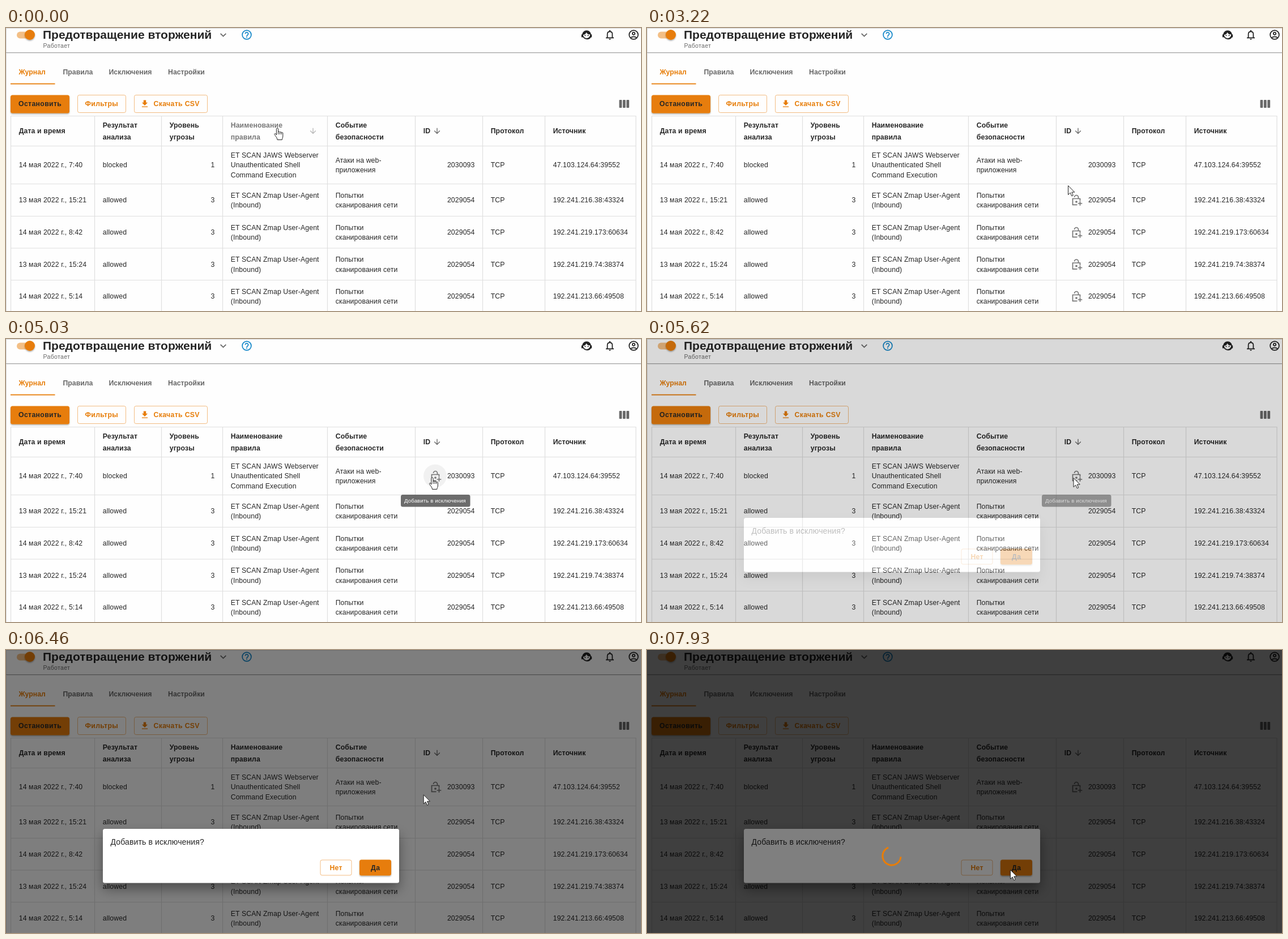
Write an HTML page that moves like this. It is 1121 px wide and 500 px high and loops after 8000 ms.

```html
<!DOCTYPE html>
<html lang="ru">
<head>
<meta charset="utf-8">
<style>
  html, body { margin: 0; width: 100%; height: 100%; overflow: hidden; background: #fefefe; }
  svg { display: block; width: 1121px; height: 500px; }
  text { font: 12.25px "Liberation Sans", Arial, sans-serif; letter-spacing: .13px; fill: #262626; }
  .bold { font-weight: bold; }
  .button { font-weight: bold; letter-spacing: .35px; }
  .tab { font-weight: bold; letter-spacing: .03px; }
  .title { font-size: 21px; font-weight: bold; letter-spacing: 0; }
  .caption { font-size: 10.5px; letter-spacing: .35px; }
  .tip { font-size: 9.625px; }
  .question { font-size: 14px; }
  .line { fill: none; stroke: currentColor; stroke-width: 2; }
</style>
</head>
<body>
<svg id="stage" viewBox="0 0 1121 500" xmlns="http://www.w3.org/2000/svg"></svg>
<script>
const ORANGE = '#e77d08', GRAY = '#686868', INK = '#222';
const LOOP = 8000;
const columns = [8.5, 156.5, 274.5, 382.5, 567.5, 722.5, 841.5, 951.5, 1112];
const rowLines = [155.5, 208.5, 275.5, 332.5, 389, 445.5];
const rowCenters = [242, 304, 361, 417.5, 474];
const ICON_X = 758;

// Text is placed by the vertical centre of its line.
const text = (x, y, str, cls = '', fill = '', anchor = 'start') =>
  `<text x="${x}" y="${y + 4.3}" class="${cls}" text-anchor="${anchor}"${fill && ` style="fill:${fill}"`}>${str}</text>`;
const lines = (x, center, step, list, cls, fill) =>
  list.map((s, i) => text(x, center + (i - (list.length - 1) / 2) * step, s, cls, fill)).join('');
const rect = (x, y, w, h, fill, r = 0, extra = '') =>
  `<rect x="${x}" y="${y}" width="${w}" height="${h}" rx="${r}" fill="${fill}" ${extra}/>`;
// Icons are drawn on a 24-unit grid around their centre.
const icon = (x, y, color, body, scale = .875) =>
  `<g transform="translate(${x} ${y}) scale(${scale}) translate(-12 -12)" style="color:${color}" fill="${color}">${body}</g>`;
const stroke = d => `<path class="line" d="${d}"/>`;
const outlined = (x, y, w, h) =>
  rect(x + .5, y + .5, w - 1, h - 1, 'none', 3, `stroke="${ORANGE}" stroke-opacity=".5"`);
const filled = (x, y, w, h, id = '') =>
  rect(x, y, w, h, ORANGE, 3.5, `filter="url(#lift)" ${id}`);

const sortArrow = (x, color) => icon(x, 182, color,
  '<path d="M20 12l-1.4-1.4L13 16.2V4h-2v12.2l-5.6-5.6L4 12l8 8z"/>', .656);

function topBar() {
  return rect(0, 0, 1121, 1, '#d4d4d4') + rect(0, 0, 1, 500, '#d9d9d9') +
    rect(0, 43, 1121, 1, '#a2a2a2') + rect(0, 44, 1121, 1, '#e6e6e6') +
    rect(19, 6.5, 31, 12, '#f3bf86', 6) +
    `<circle cx="42" cy="12" r="9" fill="${ORANGE}" filter="url(#lift)"/>` +
    text(65, 14.7, 'Предотвращение вторжений', 'title') +
    text(65.5, 30.8, 'Работает', 'caption', GRAY) +
    icon(383.5, 12, '#666', stroke('M6.5 9.5l5.5 5.5 5.5-5.5')) +
    icon(425, 12, '#1588c9', '<circle class="line" cx="12" cy="12" r="9"/>' +
      stroke('M9 10a3 3 0 1 1 4.6 2.5c-1 .7-1.6 1.2-1.6 2.5M12 16v2')) +
    icon(1025, 12, INK, '<circle class="line" cx="12" cy="12" r="8"/>' +
      '<path d="M4 12C4 2 20 2 20 11c-4 1-7-1-8.500-4C10.500 10 8 12 4 12z"/>' +
      '<circle cx="9" cy="13.500" r="1.200"/><circle cx="15" cy="13.500" r="1.200"/>' +
      rect(1.5, 11, 3, 6, 'currentColor', 1) + rect(19.5, 11, 3, 6, 'currentColor', 1) +
      stroke('M20 16c-1 3-4 4.500-8 4.500')) +
    icon(1066, 12, INK, stroke('M7 18v-7.500c0-3 2-5 5-5s5 2 5 5V18M4 18h16') +
      '<circle cx="12" cy="4" r="1.500"/><path d="M10 20h4a2 2 0 0 1-4 0z"/>') +
    icon(1108, 12, INK, '<circle class="line" cx="12" cy="12" r="9"/>' +
      '<circle class="line" cx="12" cy="9.500" r="2.500"/>' + stroke('M6 18c3-3 9-3 12 0'));
}

function controls() {
  const tabs = [[100.5, 'Правила'], [181.5, 'Исключения'], [286, 'Настройки']];
  return text(22.5, 78, 'Журнал', 'tab', ORANGE) +
    tabs.map(([x, s]) => text(x, 78, s, 'tab', GRAY)).join('') +
    rect(8, 97.7, 78.5, 1.8, ORANGE) +
    filled(8, 118.5, 104, 32) + text(22, 134, 'Остановить', 'button') +
    outlined(126, 118, 86, 32) + text(139.5, 134, 'Фильтры', 'button', ORANGE) +
    outlined(226, 118, 130, 32) + text(260.5, 134, 'Скачать CSV', 'button', ORANGE) +
    icon(245, 134, ORANGE, '<path d="M19 9h-4V3H9v6H5l7 7zM5 18v2h14v-2z"/>', .73) +
    [0, 6.4, 12.8].map(dx => rect(1082.5 + dx, 127, 4.8, 14, GRAY, 1)).join('');
}

function table() {
  const scan = ['ET SCAN Zmap User-Agent', '(Inbound)'];
  const attempts = ['Попытки', 'сканирования сети'];
  const rows = [
    ['14 мая 2022 г., 7:40', 'blocked', 1,
      ['ET SCAN JAWS Webserver', 'Unauthenticated Shell', 'Command Execution'],
      ['Атаки на web-', 'приложения'], '2030093', '47.103.124.64:39552'],
    ...[['13 мая 2022 г., 15:21', '192.241.216.38:43324'],
      ['14 мая 2022 г., 8:42', '192.241.219.173:60634'],
      ['13 мая 2022 г., 15:24', '192.241.219.74:38374'],
      ['14 мая 2022 г., 5:14', '192.241.213.66:49508']]
      .map(([date, source]) => [date, 'allowed', 3, scan, attempts, '2029054', source])
  ];
  const heads = [['Дата и время'], ['Результат', 'анализа'], ['Уровень', 'угрозы'], null,
    ['Событие', 'безопасности'], ['ID'], ['Протокол'], ['Источник']];
  const left = i => columns[i] + 14.2;
  const grid = rowLines.map(y => `M8 ${y}H1112.500`).join('') +
    columns.map(x => `M${x} 155V500`).join('');
  return `<path d="${grid}" stroke="#dfdfdf" stroke-width="1.2" fill="none"/>` +
    heads.map((h, i) => h ? lines(left(i), 181.7, 21, h, 'bold') : '').join('') +
    sortArrow(761, '#666') +
    rows.map(([date, result, level, rule, event, id, source], i) => {
      const y = rowCenters[i];
      return text(left(0), y, date) + text(left(1), y, result) +
        text(368.5, y, level, '', '', 'end') +
        lines(left(3), y, 17.5, rule) + lines(left(4), y, 17.5, event) +
        text(827.5, y, id, '', '', 'end') + text(left(6), y, 'TCP') + text(left(7), y, source);
    }).join('');
}

const ruleHead = (id, fill, extra = '') =>
  `<g id="${id}">${lines(396.7, 181.7, 21, ['Наименование', 'правила'], 'bold', fill)}${extra}</g>`;

const lock = y => `<g transform="translate(${ICON_X} ${y})" fill="none" stroke="#757575" stroke-width="1.7">
  <path d="M1.500 8.300H-6.500V-2.500H6.500V1.500M3.500-2.500V-5a3.500 3.500 0 0 0-7 0M6.500 2.200v7.600M2.700 6h7.600"/>
  <circle cy="3" r="1" /></g>`;

const tooltip = (id, y) => `<g id="${id}">${rect(697, y + 33, 122.5, 21.5, '#616161', 3.5, 'opacity=".93"')}` +
  text(703, y + 43, 'Добавить в исключения', 'tip', '#fff') + '</g>';

const dialog = rect(171, 316, 523, 95.5, '#fff', 3.5, 'filter="url(#deep)"') +
  text(184.5, 339.5, 'Добавить в исключения?', 'question') +
  outlined(554.5, 370.5, 56, 28) + text(582.7, 384.5, 'Нет', 'button', ORANGE, 'middle') +
  filled(624, 370.5, 56, 28, 'id="yes"') + text(652.2, 384.5, 'Да', 'button', '', 'middle');

const stage = document.getElementById('stage');
stage.innerHTML = `<defs>
  <filter id="lift" x="-20%" y="-30%" width="140%" height="180%">
    <feDropShadow dx="0" dy="1.500" stdDeviation="1.200" flood-opacity=".35"/></filter>
  <filter id="deep" x="-10%" y="-40%" width="120%" height="220%">
    <feDropShadow dx="0" dy="11" stdDeviation="11" flood-opacity=".38"/></filter></defs>` +
  rect(0, 0, 1121, 500, '#fefefe') + topBar() + controls() + table() +
  ruleHead('headIdle', '') + ruleHead('headHover', '#777', sortArrow(542, '#b5b5b5')) +
  `<circle id="halo" cx="757.500" r="20.500" opacity=".05"/>` +
  `<g id="firstLock">${lock(rowCenters[0])}</g>` +
  `<g id="otherLocks">${rowCenters.slice(1).map(lock).join('')}</g>` +
  tooltip('tipFirst', rowCenters[0]) + tooltip('tipSecond', rowCenters[1]) +
  `<g id="modal">${rect(0, 0, 1121, 500, '#000', 0, 'opacity=".5"')}${dialog}</g>
  <g id="loader">${rect(0, 0, 1121, 500, '#000', 0, 'opacity=".5"')}
    <circle id="spinner" cx="432" cy="364" r="16.100" fill="none" stroke="${ORANGE}" stroke-width="3.100"/></g>
  <g id="cursor" fill="#fff" stroke="#222" stroke-width="1" stroke-linejoin="round">
    <path id="arrow" d="M.500.500V16.500L4.200 13 6.800 18.800 9.300 17.700 6.800 12H11.800Z"/>
    <path id="hand" d="M-1.600 12V1.500a1.600 1.600 0 0 1 3.200 0V7a1.500 1.500 0 0 1 2.900.4 1.500 1.500 0 0 1 2.800.6
      1.400 1.400 0 0 1 2.500.8V14c0 3-1.500 4-1.500 6.500H0C0 17-3 14.500-4.800 11.500-5.800 9.800-3.600 8.700-2.600 10z
      M1.600 7v4M4.500 7.400v3.600M7.300 8v3"/></g>`;

const el = {};
stage.querySelectorAll('[id]').forEach(node => el[node.id] = node);

// Pointer path: time, x, y.
const path = [
  [0, 479, 177], [30, 479, 177], [800, 708, 247], [1000, 714, 250], [1210, 729, 253],
  [1630, 744, 244], [1740, 751, 241], [2600, 751, 241], [3080, 746, 274], [3220, 743, 278],
  [3600, 752, 306], [4200, 752, 306], [5030, 752.5, 245], [6390, 752.5, 245], [6460, 737, 255],
  [6870, 617, 377], [6980, 617, 377], [7260, 641, 388], [LOOP, 641, 388]
];
const ramp = (t, from, to) => Math.min(1, Math.max(0, (t - from) / (to - from)));
const smooth = k => k * k * (3 - 2 * k);
const show = (node, on) => node.setAttribute('visibility', on ? 'visible' : 'hidden');
const fade = (node, k) => { node.setAttribute('opacity', k); show(node, k > 0); };

function pointerAt(t) {
  const i = Math.max(1, path.findIndex(p => p[0] >= t));
  const [t0, x0, y0] = path[i - 1], [t1, x1, y1] = path[i];
  const k = ramp(t, t0, t1);
  return [x0 + (x1 - x0) * k, y0 + (y1 - y0) * k];
}

function spin(t) {
  const turn = (t - 7400) / 1400;
  const grow = smooth(ramp(turn, 0, .5));
  const unit = 16.1 / 20.2;
  el.spinner.setAttribute('stroke-dasharray', `${(1 + 99 * grow) * unit} ${200 * unit}`);
  el.spinner.setAttribute('stroke-dashoffset', -15 * grow * unit);
  el.spinner.setAttribute('transform', `rotate(${turn * 360 - 168} 432 364)`);
}

function draw(t) {
  const [x, y] = pointerAt(t);
  const browsing = t < 5400;
  const onHead = browsing && y < rowLines[1];
  const onRuleHead = onHead && x < columns[4];
  const onFirst = !onHead && (!browsing || y < rowLines[2]);
  const lockY = rowCenters[onFirst ? 0 : 1];
  const onLock = !onHead && t < 5550 && Math.hypot(x - ICON_X, y - lockY) < 20;
  const onYes = t > 7020 && t < 7400 && x > 624;

  show(el.headIdle, !onRuleHead);
  show(el.headHover, onRuleHead);
  show(el.firstLock, onFirst);
  show(el.otherLocks, !onHead && !onFirst);
  show(el.halo, onLock);
  el.halo.setAttribute('cy', lockY);

  fade(el.tipFirst, t < 4000
    ? ramp(t, 1680, 1800) * (1 - ramp(t, 2680, 2880))
    : ramp(t, 4920, 5030) * (1 - ramp(t, 5500, 5800)));
  fade(el.tipSecond, ramp(t, 3600, 3720) * (1 - ramp(t, 4320, 4500)));
  fade(el.modal, smooth(ramp(t, 5530, 5785)));
  fade(el.loader, smooth(ramp(t, 7370, 7620)));
  el.yes.setAttribute('fill', onYes ? '#b56206' : ORANGE);
  spin(t);

  const hand = onYes || browsing && (onHead || onLock);
  show(el.hand, hand);
  show(el.arrow, !hand);
  el.cursor.setAttribute('transform', `translate(${x} ${y})`);
}

function frame() {
  draw(performance.now() % LOOP);
  requestAnimationFrame(frame);
}
frame();
</script>
</body>
</html>
```
